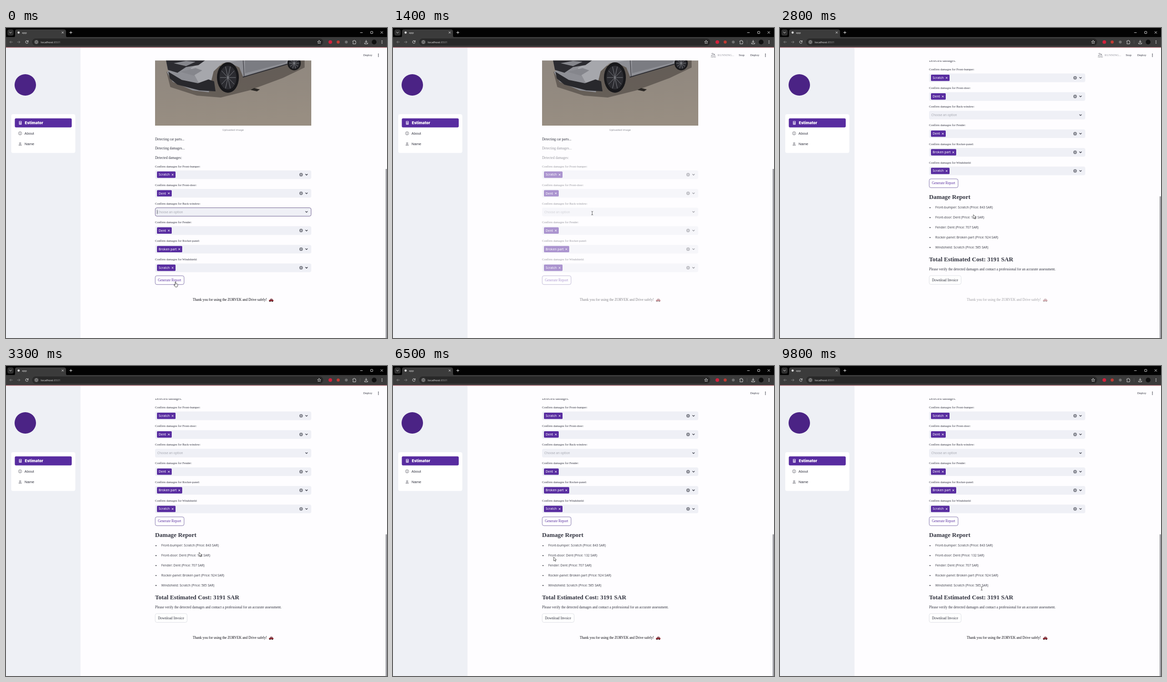
An HTML page that plays this animation: 800x651 px, repeating every 9.9 s.

```html
<!DOCTYPE html>
<html lang="en">
<head>
<meta charset="utf-8">
<title>app</title>
<style>
  html, body { margin: 0; width: 100%; height: 100%; overflow: hidden; background: #fefdff; }
  svg { display: block; width: 800px; height: 651px; }
  text { white-space: pre; }
  .serif { font-family: "Liberation Serif", "Times New Roman", serif; fill: #31333f; }
  .sans { font-family: "Noto Sans", "Open Sans", sans-serif; }
  .menu { font-family: "Liberation Sans", Arial, sans-serif; fill: #31333f; }
  .line { fill: none; stroke-linecap: round; stroke-linejoin: round; }
</style>
</head>
<body>
<svg id="stage" viewBox="0 0 800 651" xmlns="http://www.w3.org/2000/svg"></svg>
<script>
const PURPLE = '#582ca0', INK = '#31333f', FIELD = '#eff0f6';
const LOOP = 9900, STEP = 100, SCROLL = 203.4;
const CLICK = 300, REPORT = 2800, DONE = 3100;

const rect = (x, y, w, h, fill, r = 0, extra = '') =>
  `<rect x="${x}" y="${y}" width="${w}" height="${h}" rx="${r}" fill="${fill}" ${extra}/>`;
const circle = (x, y, r, fill, extra = '') =>
  `<circle cx="${x}" cy="${y}" r="${r}" fill="${fill}" ${extra}/>`;
const line = (d, color, w = 1, extra = '') =>
  `<path class="line" d="${d}" stroke="${color}" stroke-width="${w}" ${extra}/>`;
const shape = (d, fill, extra = '') => `<path d="${d}" fill="${fill}" ${extra}/>`;
const text = (x, y, str, size, cls = 'serif', extra = '') =>
  `<text x="${x}" y="${y}" font-size="${size}" class="${cls}" ${extra}>${str}</text>`;
const group = (id, body, extra = '') => `<g id="${id}" ${extra}>${body}</g>`;
const cross = (x, y, r, color, w) =>
  line(`M${x - r} ${y - r}l${2 * r} ${2 * r}M${x + r} ${y - r}l${-2 * r} ${2 * r}`, color, w);
const dots = (x, y, color) => [-2.6, 0, 2.6].map(d => circle(x, y + d, 0.85, color)).join('');

function browser() {
  const pale = '#e3e3e3', dim = '#858585';
  return rect(0, 0, 800, 20, '#030303') +
    rect(3, 3, 13, 13, '#303030', 4) +
    line('M7.4 8.6l2.1 2.1 2.1-2.1', pale, 1) +
    shape('M16 20q3-1 3-4V7q0-4 4-4h98q5 0 5 4v9q0 3 3 4z', '#3b3b3b') +
    rect(0, 19, 800, 21.5, '#3b3b3b') +
    circle(26.5, 9.6, 2.3, '#d8d8d8') +
    text(33.6, 11.6, 'app', 5.6, 'sans', `fill="${pale}"`) +
    cross(119, 9.5, 1.7, pale, 0.9) +
    line('M133.7 9.5h5M136.2 7v5', pale, 1) +
    line('M744 9.7h4.5', pale, 0.9) +
    rect(765.7, 7.2, 4.4, 4.4, 'none', 0.4, `stroke="${pale}" stroke-width=".9"`) +
    cross(789, 9.4, 2.2, pale, 0.9) +
    line('M13.5 29.5h-5.5m2.4-2.4l-2.4 2.4 2.4 2.4', dim, 0.9) +
    line('M24 29.5h5.5m-2.4-2.4l2.4 2.4-2.4 2.4', dim, 0.9) +
    line('M46.3 28a2.8 2.8 0 1 0 .2 2.4M46.6 26.6v1.9h-1.9', pale, 1) +
    rect(55, 22, 611, 15, '#282828', 7.5) +
    circle(63.8, 29.5, 5.6, '#3a3a3a') +
    circle(63.8, 29.5, 2.9, 'none', `stroke="${pale}" stroke-width=".8"`) +
    line('M63.8 29.3v1.5M63.8 28v.1', pale, 0.8) +
    text(73, 31.7, 'localhost<tspan fill="#9a9a9a">:8501</tspan>', 6.12, 'sans', `fill="${pale}"`) +
    line('M657.5 26l1 2.3 2.5.2-1.9 1.7.6 2.5-2.2-1.3-2.2 1.3.6-2.5-1.9-1.7 2.5-.2z', pale, 0.8) +
    circle(681, 29.5, 3.8, '#d3203c') +
    circle(697.5, 29.5, 3.2, '#c23a32') +
    circle(714.5, 29.5, 3, '#717171') +
    line('M728.5 27.2h1.7v-.8q1.2-1.5 2.2 0v.8h1.8v2q1.6 1.1 0 2.2v1.9h-5.7v-2q1.5-1 0-2.2z', pale, 0.9) +
    line('M743.5 26v7', '#5a5a5a', 0.7) +
    line('M756.2 25.8v4.6m-2-1.8l2 2 2-2M753 31.3v1.9h6.4v-1.9', pale, 1) +
    circle(773, 29.5, 5, '#101010') +
    dots(789.5, 29.5, pale);
}

function sidebar() {
  return rect(0, 41, 156.5, 610, '#eef0f5') +
    circle(40.5, 119.5, 22.5, '#4b2385') +
    rect(11, 181, 134.5, 81.5, '#fff', 4) +
    rect(18.5, 189.8, 119.5, 18.9, PURPLE, 2.6) +
    rect(27.3, 195.4, 5.5, 7.6, '#eee6fa', 0.8) +
    rect(28.4, 196.5, 3.3, 1.6, PURPLE) +
    line('M28.7 199.6h2.8M28.7 201.3h2.8', PURPLE, 0.8, 'stroke-dasharray=".8 1.1" stroke-linecap="butt"') +
    text(39.6, 201.9, 'Estimator', 7.9, '', 'fill="#fff" style="font-family:Inter,sans-serif;font-weight:900"') +
    circle(29.6, 221.2, 3.4, 'none', `stroke="${INK}" stroke-width=".6"`) +
    line('M29.6 220.8v2.2M29.6 219.3v.1', INK, 0.7) +
    text(38.8, 223.9, 'About', 7.65, 'menu') +
    circle(29.7, 241.9, 1.5, 'none', `stroke="${INK}" stroke-width=".6"`) +
    line('M27.1 246q.2-2 2.6-2t2.6 2z', INK, 0.6) +
    text(38.9, 246.2, 'Name', 7.65, 'menu');
}

function wheel(x, y, rx, ry) {
  let spokes = '';
  for (let i = 0; i < 10; i++) {
    const a = i * Math.PI / 5;
    spokes += `M${x} ${y}L${x + Math.cos(a) * rx * 0.7} ${y + Math.sin(a) * ry * 0.74}`;
  }
  const oval = (k, fill) => `<ellipse cx="${x}" cy="${y}" rx="${rx * k}" ry="${ry * k}" fill="${fill}"/>`;
  return oval(1, '#18181b') + oval(0.78, '#2b2b30') + line(spokes, '#85868c', 0.9);
}

function photo() {
  return `<g clip-path="url(#frame)">` +
    rect(313, 68, 328, 137, 'url(#gravel)') +
    shape('M337 92l8 32 56 18 50 4 60-15 70-26 46-22V68h-80z', '#564f4a', 'opacity=".75"') +
    shape('M366 68h232l-8 8-92 27-8-20-28-14-28 20-8 46-34-4-42-18-12-20z', '#8e8f95') +
    shape('M388 84l28-16h76l-38 6-18 17-8 32-24-9z', '#a6a7ac') +
    shape('M502 68h88l-4 5-84 22z', '#7b7c82') +
    shape('M336 68h82l-14 10-26 4-18 12-20-6z', '#2c2c31') +
    shape('M341 92l28 17 34 7 22-8 12 4 3 21-34-2-46-12-16-13z', '#28282c') +
    shape('M352 74l26-5 20 2-20 9zM366 92l32-8 14 5-18 11z', '#85868c') +
    line('M498 68l2 34', '#414147', 1.3) +
    line('M498 103l92-27', '#2f2f34', 2) +
    wheel(466, 104, 23, 32) + wheel(605, 74, 14, 15) +
    shape('M513 130l8-4 12 3-6 4z', '#2b2825') + `</g>`;
}

function field(i, part, tag, end) {
  const y = 299 + i * 39.1, mid = y + 9;
  let out = text(313, y - 6.4, `Confirm damages for ${part}:`, 6.5) + rect(313, y, 328, 18.2, FIELD, 3.6);
  if (tag) {
    out += rect(317, mid - 6.7, end - 317, 13.4, PURPLE, 1.6) +
      text(320.6, mid + 2.4, tag, 6.8, 'sans', 'fill="#fff"') +
      cross(end - 6.2, mid + 0.1, 1.4, '#fff', 1) +
      circle(619.6, mid, 3.7, '#80828b') + cross(619.6, mid, 1.2, FIELD, 0.9);
  } else {
    out += text(317.8, mid + 2.4, 'Choose an option', 6.53, 'sans', 'fill="#a4a6af"') +
      group('focus', rect(313.4, y + 0.3, 327.3, 17.7, 'none', 3.6, 'stroke="#6a5b8d" stroke-width=".9"') +
        line(`M317.4 ${mid - 4}v8.4`, INK, 0.7));
  }
  return out + line(`M629 ${mid - 1}l2 2 2-2`, INK, 1.2);
}

const button = (y, w, label, color, border) =>
  rect(313.3, y, w, 18.4, '#fff', 3.6, `stroke="${border}" stroke-width=".8"`) +
  text(318.9, y + 11.6, label, 7.43, 'serif', `style="fill:${color}"`);

const fields = [
  ['Front-bumper', 'Scratch', 356], ['Front-door', 'Dent', 348], ['Back-window'],
  ['Fender', 'Dent', 348], ['Rocker-panel', 'Broken part', 370], ['Windshield', 'Scratch', 356]
];
const costs = [
  ['Front-bumper', 'Scratch', 843], ['Front-door', 'Dent', 132], ['Fender', 'Dent', 707],
  ['Rocker-panel', 'Broken part', 924], ['Windshield', 'Scratch', 585]
];

function page() {
  return photo() +
    text(476.8, 215.9, 'Uploaded image', 5.8, 'sans', 'fill="#8a8b93" text-anchor="middle"') +
    text(313, 236, 'Detecting car parts...', 7.43) +
    group('second', text(313, 255.2, 'Detecting damages...', 7.43)) +
    group('form', text(313, 274.6, 'Detected damages:', 7.43) +
      fields.map((f, i) => field(i, ...f)).join('') +
      button(520.3, 60.6, 'Generate Report', PURPLE, '#6a5a9c'));
}

function report() {
  const bold = 'font-weight="700"';
  return text(313, 358.8, 'Damage Report', 12.87, 'serif', bold) +
    costs.map(([part, kind, price], i) => circle(315, 377.3 + i * 20.9, 1.1, INK) +
      text(326, 379.3 + i * 20.9, `${part}: ${kind} (Price: ${price} SAR)`, 6.69, 'sans', 'fill="#43454f"')).join('') +
    text(313, 489.6, 'Total Estimated Cost: 3191 SAR', 12.82, 'serif', bold) +
    text(313, 509.2, 'Please verify the detected damages and contact a professional for an accurate assessment.', 7.43) +
    button(520, 67, 'Download Invoice', INK, '#d9dae0');
}

function footer() {
  return text(392, 573.3, 'Thank you for using the ZORVEK and Drive safely!', 7.43, 'serif', 'style="fill:#0c0c12"') +
    shape('M552.2 574v-2.6l1.7-.7 1.6-2.2h3.4l1.6 2.2 1 .6v2.7z', '#9c2a33') +
    shape('M554.8 570.8l1.1-1.5h2.7l1 1.5z', '#6f8792') +
    circle(554.3, 573.9, 1.2, '#26262a') + circle(559.2, 573.9, 1.2, '#26262a');
}

function status() {
  const grey = '#77787f';
  const wave = y => `M667.8 ${y}q1.2-1.2 2.4 0t2.4 0 2.4 0 2.4 0`;
  return group('run', circle(673.2, 53.2, 1.1, grey) +
      line('M672.3 55l-1.2 3.2 2.2 1.4-.6 2.6M671 58.4l-1 2.3h-2M669.3 56.8l1-1.7h2.3l1.4 2 1.6.2', grey, 0.9)) +
    group('swim', circle(675, 55.6, 1.1, grey) +
      line('M669 53.6l2.8-.6 1.6 3M669.2 57l3-1.8', grey, 0.9) +
      line(wave(58.6) + wave(61.2), grey, 0.8)) +
    text(681.6, 59.2, 'RUNNING...', 6.53, 'serif', 'style="fill:#999aa2"') +
    text(726, 59.2, 'Stop', 6.5);
}

const pointers = {
  arrow: shape('M0 0v8.2l1.9-1.7 1.3 2.8 1.3-.6-1.3-2.7h2.5z', '#fff', 'stroke="#222" stroke-width=".7" stroke-linejoin="round"'),
  beam: line('M-1.5-3.5q1.5 0 1.5.8v6.2M-1.5 4q1.5 0 1.5-.8M1.5-3.5Q0-3.5 0-2.7M1.5 4Q0 4 0 3.2', '#333', 0.7),
  hand: shape('M-1 .5q1-1.2 1.8 0v3.5l3.2.8q1 .4.8 1.6l-.6 2.6-1 1.8h-3.6l-3-4q0-1.3 1.3-.7l1.1 1z', '#fff', 'stroke="#222" stroke-width=".8" stroke-linejoin="round"')
};

// time, x, y, pointer used from then on
const path = [
  [0, 356, 533, 'hand'], [300, 356, 533, 'hand'], [500, 372, 500, 'arrow'], [900, 421.5, 387.5, 'beam'],
  [2300, 410.5, 391, 'beam'], [2800, 406, 392, 'arrow'], [3300, 405.5, 391.5, 'arrow'],
  [3900, 398, 401, 'arrow'], [4100, 398, 401, 'arrow'], [4300, 386, 379, 'beam'], [4400, 386, 379, 'beam'],
  [4900, 306, 377, 'arrow'], [5100, 301, 378, 'arrow'], [5400, 429, 433, 'arrow'],
  [5900, 320, 378, 'arrow'], [6300, 320, 378, 'arrow'], [6900, 387, 467, 'arrow'],
  [7300, 334, 398, 'beam'], [7500, 350, 425, 'arrow'], [7800, 409, 471, 'arrow'],
  [8300, 499, 484, 'beam'], [8900, 320, 466, 'arrow'], [9300, 360, 466, 'beam'], [9800, 423.5, 467, 'beam']
];

function pointerAt(t) {
  let i = path.length - 1;
  while (path[i][0] > t) i--;
  const a = path[i], b = path[i + 1] || a;
  const k = b === a ? 0 : (t - a[0]) / (b[0] - a[0]);
  const e = k * k * (3 - 2 * k);
  return [a[1] + (b[1] - a[1]) * e, a[2] + (b[2] - a[2]) * e, a[3]];
}

const stage = document.getElementById('stage');
stage.innerHTML = `<defs>
    <clipPath id="view"><rect x="156" y="68.3" width="644" height="583"/></clipPath>
    <clipPath id="frame"><rect x="313" y="68" width="328" height="137"/></clipPath>
    <linearGradient id="gravel" x1="0" y1="0" x2=".15" y2="1">
      <stop offset="0" stop-color="#8f877f"/><stop offset=".55" stop-color="#938a80"/><stop offset="1" stop-color="#988e82"/>
    </linearGradient>
  </defs>` +
  rect(0, 0, 800, 651, '#fefdff') + sidebar() + browser() +
  rect(0, 40.2, 800, 1.2, '#ad5f68') +
  `<g clip-path="url(#view)">${group('page', page())}</g>` +
  group('report', report()) + group('footer', footer()) + group('status', status()) +
  text(750, 59.2, 'Deploy', 6.5) + dots(782, 57.2, INK) +
  rect(797, 296, 3, 355, '#a3a3a8', 0, 'id="thumb"') +
  group('pointer', Object.entries(pointers).map(([name, art]) => group(name, art)).join(''));

const el = id => document.getElementById(id);
const show = (id, on) => { el(id).style.display = on ? '' : 'none'; };

function draw(t) {
  const loaded = t >= REPORT;
  const k = Math.min(1, Math.max(0, (t - 500) / 1000));
  const stale = 1 - 0.62 * k * k;
  el('page').setAttribute('transform', `translate(0 ${loaded ? -SCROLL : 0})`);
  el('form').style.opacity = loaded ? 1 : stale;
  el('second').style.opacity = t < 1500 ? stale : 1;
  el('footer').style.opacity = t < DONE ? stale : 1;
  show('focus', t < CLICK);
  show('report', loaded);
  show('status', t >= CLICK && t < DONE);
  show('run', t < 1400);
  show('swim', t >= 1400);
  const top = loaded ? 353.5 : 296;
  el('thumb').setAttribute('y', top);
  el('thumb').setAttribute('height', 651 - top);
  const [x, y, kind] = pointerAt(t);
  el('pointer').setAttribute('transform', `translate(${x} ${y})`);
  for (const name in pointers) show(name, name === kind);
}

const start = performance.now();
function tick() {
  const t = (performance.now() - start) % LOOP;
  draw(Math.floor(t / STEP) * STEP);
  requestAnimationFrame(tick);
}
tick();
</script>
</body>
</html>
```
